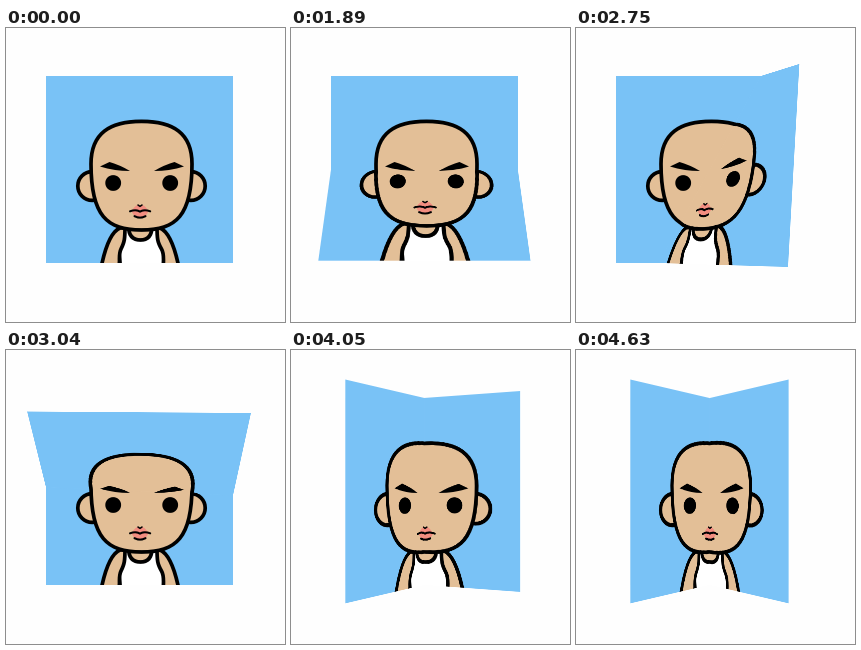
Recreate the animation shown at these times as an HTML page. Size 279 px wide and 294 px high, loop 5.22 s.

```html
<!DOCTYPE html>
<html lang="en">
<head>
<meta charset="utf-8">
<title>Folding portrait</title>
<style>
  html, body { margin: 0; width: 100%; height: 100%; overflow: hidden; background: #fefefe; }
  #card { position: absolute; left: 40px; top: 48px; width: 187px; height: 187px; perspective: 400px; }
  /* Panels are laid out at double size and scaled down, so tilted ones stay sharp. */
  #card svg {
    position: absolute; left: 0; top: 0; width: 374px; height: 374px;
    overflow: hidden; transform-origin: 0 0; will-change: transform;
  }
</style>
</head>
<body>
<div id="card">
  <svg viewBox="40 48 187 187" stroke-linejoin="round">
    <rect x="40" y="48" width="187" height="187" fill="#79c2f6"/>
    <g fill="#e3bf97" stroke="#000" stroke-width="3.7">
      <path d="M95 240 Q102 205 114 200 H154 Q166 205 173 240 Z"/>
      <path fill="#fff" d="M119 198 C119 211 118.5 214 115 221 Q112.5 226 114 240 H157 Q158.5 226 155.500 221 C151.5 214 151 211 151 198 Z"/>
      <path d="M122.5 198 Q122.5 212 134.5 212 Q146 212 146 198 Z"/>
      <circle cx="86.2" cy="158" r="14.4"/>
      <circle cx="184.8" cy="158" r="14.4"/>
      <path d="M135.5 93.4 C167 93.4 186 105 186 136 C186 188 170 202 135.5 202 C101 202 85 188 85 136 C85 105 104 93.4 135.5 93.4 Z"/>
    </g>
    <path d="M115 221 L111 237 H116 Z"/>
    <circle cx="107.2" cy="155" r="7.9"/>
    <circle cx="164.2" cy="155" r="7.9"/>
    <path d="M94 138.5 L103.5 134 Q114 137 124 143 Q108 143 94 138.5 Z"/>
    <path d="M178 138.5 L168.5 134 Q158 137 148 143 Q164 143 178 138.5 Z"/>
    <path fill="#f28d80" d="M125.5 183 Q131 174.5 134 178 Q137 174.5 142.5 183 Q140 189.5 134 189.5 Q128 189.5 125.5 183 Z"/>
    <g fill="none" stroke="#000" stroke-width="2" stroke-linecap="round">
      <path d="M124 183.3 Q130 181 134 183.7 Q138 181 144.2 183.3"/>
      <path d="M128.5 188.2 Q134 191 139.5 188.2"/>
      <path stroke-width="1.5" d="M132 177 L134 178.4 L136 177"/>
    </g>
  </svg>
</div>
<script>
const LOOP = 5220, STEP = 145, TILT = 45;

const card = document.getElementById('card');
const base = card.querySelector('svg');
const flap = base.cloneNode(true);
card.appendChild(flap);

// Sine ease that advances in held steps from `start`; `pace` is the share covered per step.
function ease(ms, start, pace, lead) {
  const n = Math.floor((ms - start) / STEP);
  const u = n < 1 ? 0 : Math.min(1, lead + n * pace);
  return (1 - Math.cos(Math.PI * u)) / 2;
}

// Keeps the half of the square facing `dir` and tilts it towards the viewer.
function fold(panel, dir, tilt, overlap) {
  const r = dir * Math.PI / 180;
  const nx = Math.cos(r), ny = Math.sin(r);
  const corner = (n, t) => `${(187 + nx * n - ny * t).toFixed(3)}px ${(187 + ny * n + nx * t).toFixed(3)}px`;
  const pts = [corner(-overlap, -400), corner(-overlap, 400), corner(400, 400), corner(400, -400)];
  panel.style.clipPath = `polygon(${pts.join(',')})`;
  panel.style.transform = 'translate(93.5px,93.5px) ' +
    `rotate3d(${ny.toFixed(5)},${(-nx).toFixed(5)},0,${tilt.toFixed(3)}deg) ` +
    'scale(.5) translate(-187px,-187px)';
}

function draw(ms) {
  const bend = ease(ms, 1290, 0.155, 0);
  const turn = ease(ms, 2450, 0.143, 0.03);
  const lift = ease(ms, 3615, 0.15, -0.02);
  const dir = 90 - 270 * turn;
  flap.style.visibility = bend ? 'visible' : 'hidden';
  fold(base, dir + 180, TILT * lift, bend ? 1.4 : 400);
  fold(flap, dir, TILT * bend, 0);
}

const start = performance.now();
function tick() {
  draw((performance.now() - start) % LOOP);
  requestAnimationFrame(tick);
}
tick();
</script>
</body>
</html>
```
